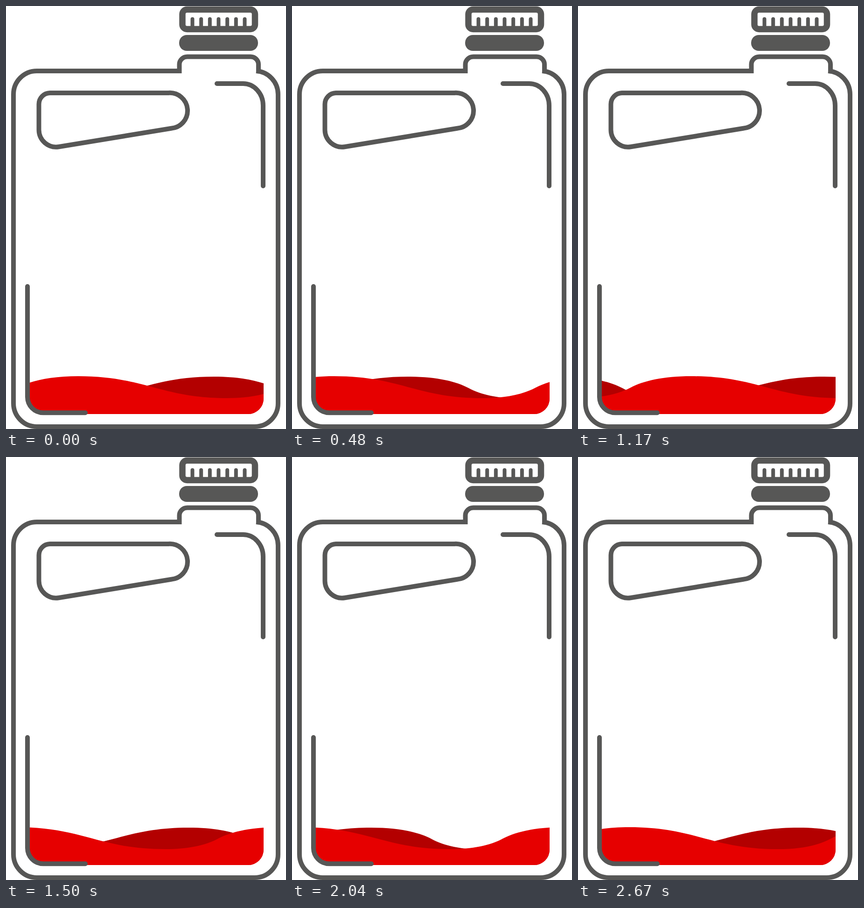
An HTML page for the animation above (2.7 s loop, 600 by 905 pixels).

```html
<!DOCTYPE html>
<html lang="en">
<head>
<meta charset="utf-8">
<title>Canister</title>
<style>
html, body { margin: 0; width: 100%; height: 100%; overflow: hidden; background: #fff; }
svg { display: block; width: 600px; height: 905px; }
.line { fill: none; stroke: #575756; stroke-width: 10; }
.round { stroke-linecap: round; }
</style>
</head>
<body>
<svg viewBox="0 0 600 905" xmlns="http://www.w3.org/2000/svg">
  <defs>
    <clipPath id="tank"><path d="M50 780H552V840A33 33 0 0 1 519 873H83A33 33 0 0 1 50 840Z"/></clipPath>
  </defs>

  <g clip-path="url(#tank)">
    <path id="back" fill="#b30000"/>
    <path id="front" fill="#e60000"/>
  </g>

  <!-- body and neck -->
  <path class="line" d="M376 139H66A50 50 0 0 0 16 189V850A50 50 0 0 0 66 900H533A50 50 0 0 0 583 850V189A50 50 0 0 0 536 139.1"/>
  <path class="line" d="M371.5 144V125A17 16.5 0 0 1 388.5 108.5H524A17 16.5 0 0 1 541 125V144"/>

  <!-- cap -->
  <rect x="371" y="62" width="169" height="34" rx="16.5" fill="#575756"/>
  <rect class="line" x="378" y="7.5" width="155.5" height="42" rx="10" style="stroke-width:13.5"/>
  <path id="ticks" class="line round" style="stroke-width:8"/>

  <!-- handle -->
  <path class="line" d="M94 186H348A38 38 0 0 1 354 261.8L113 301.3A37 37 0 0 1 70.5 265V210A24 24 0 0 1 94 186Z"/>

  <!-- highlights -->
  <path class="line round" d="M452 166H508A43 47 0 0 1 551 213V385"/>
  <path class="line round" d="M46 600V836A34 34 0 0 0 80 870.3H170"/>
</svg>
<script>
const LOOP = 2700, STEP = 30, WAVE = 562;
const el = id => document.getElementById(id);

// One wavelength, crest to crest: long fall, short rise.
const tile = 'c142 0 177 47 319 47c48 0 86 -8 113 -22.5c27 -14.5 70 -24.5 130 -24.5';
const wave = `M${-2 * WAVE} 0${tile.repeat(4)}V100H${-2 * WAVE}Z`;
el('back').setAttribute('d', wave);
el('front').setAttribute('d', wave);

let ticks = '';
for (let i = 0; i < 7; i++) ticks += `M${399.5 + i * 18.67} 28V46`;
el('ticks').setAttribute('d', ticks);

const wrap = x => ((x % WAVE) + WAVE) % WAVE;

function draw(ms) {
  const t = Math.floor((ms % LOOP) / STEP) * STEP;
  el('front').setAttribute('transform', `translate(${wrap(155 + 1.0356 * t)} 792)`);
  el('back').setAttribute('transform', `translate(${wrap(446 - 0.411 * t)} 793) scale(-1 1)`);
}

const start = performance.now();
function tick() {
  draw(performance.now() - start);
  requestAnimationFrame(tick);
}
tick();
</script>
</body>
</html>
```
